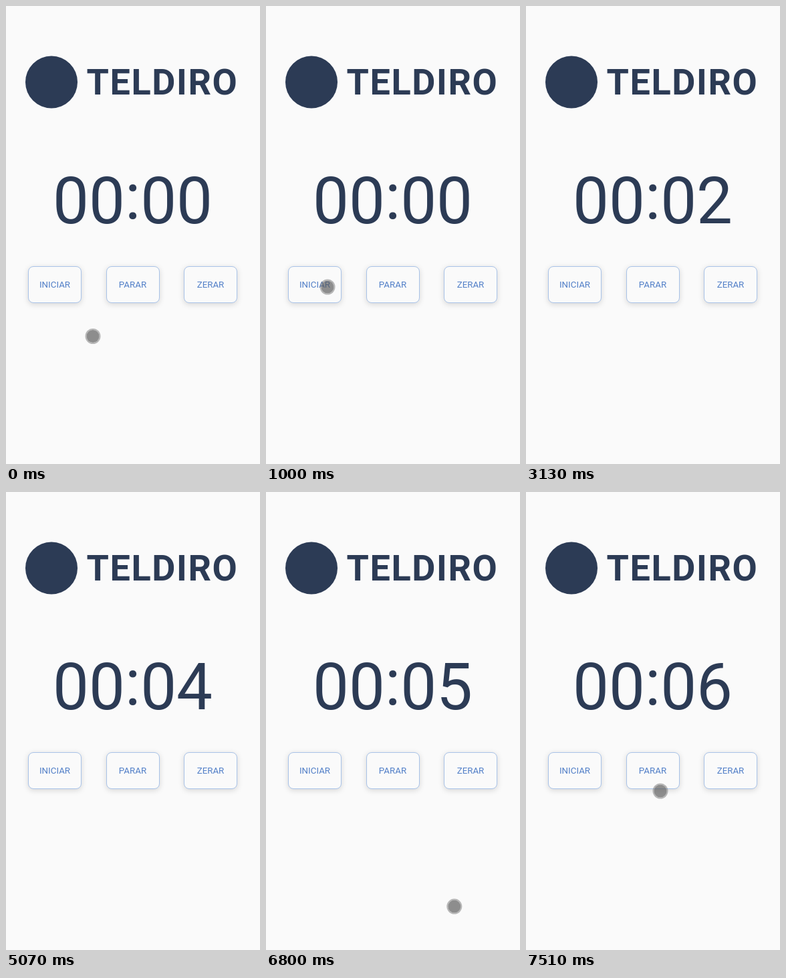
An HTML page that plays this animation: 380 px wide and 683 px high, repeating every 8000 ms.

```html
<!DOCTYPE html>
<html lang="pt">
<head>
<meta charset="utf-8">
<title>Timer</title>
<style>
  html, body { margin: 0; width: 100%; height: 100%; overflow: hidden; background: #fafafa; }
  body { position: relative; font-family: Roboto, sans-serif; }
  svg { position: absolute; left: 0; top: 0; }
  nav {
    position: absolute; left: 33px; top: 388px; width: 313px;
    display: flex; justify-content: space-between;
  }
  button {
    width: 80px; height: 55px; padding: 0; box-sizing: border-box;
    border: 1px solid #a9c3e8; border-radius: 8px; background: #fafafa; color: #5380c8;
    font: 13.333px Roboto, sans-serif; box-shadow: 0 2px 8px rgba(0, 0, 0, .15);
  }
  #tap {
    position: absolute; left: 33px; top: 388px; width: 80px; height: 55px;
    border-radius: 8px; background: rgba(51, 181, 229, .4);
  }
  #cursor {
    position: absolute; left: -11.5px; top: -11.5px; width: 23px; height: 23px; box-sizing: border-box;
    border: 2px solid rgba(110, 110, 110, .47); border-radius: 50%;
    background: rgba(85, 85, 85, .66); background-clip: padding-box;
  }
</style>
</head>
<body>
<svg width="380" height="683" fill="#2c3b55">
  <circle cx="68" cy="113.5" r="39"/>
  <text x="120.5" y="131.5" font-size="54" font-weight="700" letter-spacing="1.6">TELDIRO</text>
  <text x="189.5" y="324.4" font-size="96" text-anchor="middle">00<tspan dy="-7">:</tspan><tspan id="seconds" dy="7">00</tspan></text>
</svg>
<nav><button>INICIAR</button><button>PARAR</button><button>ZERAR</button></nav>
<div id="tap"></div>
<div id="cursor"></div>
<script>
  const LOOP = 8000;
  const SAMPLE = 66;
  const COUNT_START = 1060;

  // Each stroke is a quadratic curve a -> b bent towards c, eased in by a power.
  const strokes = [
    { start: 122, end: 940, a: [129.5, 492], c: [112, 488], b: [91.5, 418.5], power: 1 },
    { start: 1000, end: 1250, a: [91.5, 418.5], c: [123, 480], b: [154.5, 541.5], power: 1 },
    { start: 6600, end: 7455, a: [283, 620.5], c: [176, 440], b: [200.5, 445.5], power: 3.3 }
  ];

  const seconds = document.getElementById('seconds');
  const tap = document.getElementById('tap');
  const cursor = document.getElementById('cursor');
  const show = (el, on) => el.style.visibility = on ? 'visible' : 'hidden';

  function pointer(t) {
    const { start, end, a, b, c, power } = strokes.findLast(s => t >= s.start) || strokes[0];
    const sampled = Math.floor((t - start) / SAMPLE) * SAMPLE;
    const p = Math.min(1, Math.max(0, sampled / (end - start))) ** power;
    const q = 1 - p;
    return a.map((from, i) => q * q * from + 2 * p * q * c[i] + p * p * b[i]);
  }

  function draw(now) {
    const t = now % LOOP;
    const count = Math.max(0, Math.floor((t - COUNT_START) / 1000));
    seconds.textContent = String(count).padStart(2, '0');
    show(tap, t >= 1080 && t < 1250);
    show(cursor, t < 1330 || t >= 6600);
    const [x, y] = pointer(t);
    cursor.style.transform = `translate(${x}px, ${y}px)`;
    requestAnimationFrame(draw);
  }
  requestAnimationFrame(draw);
</script>
</body>
</html>
```
